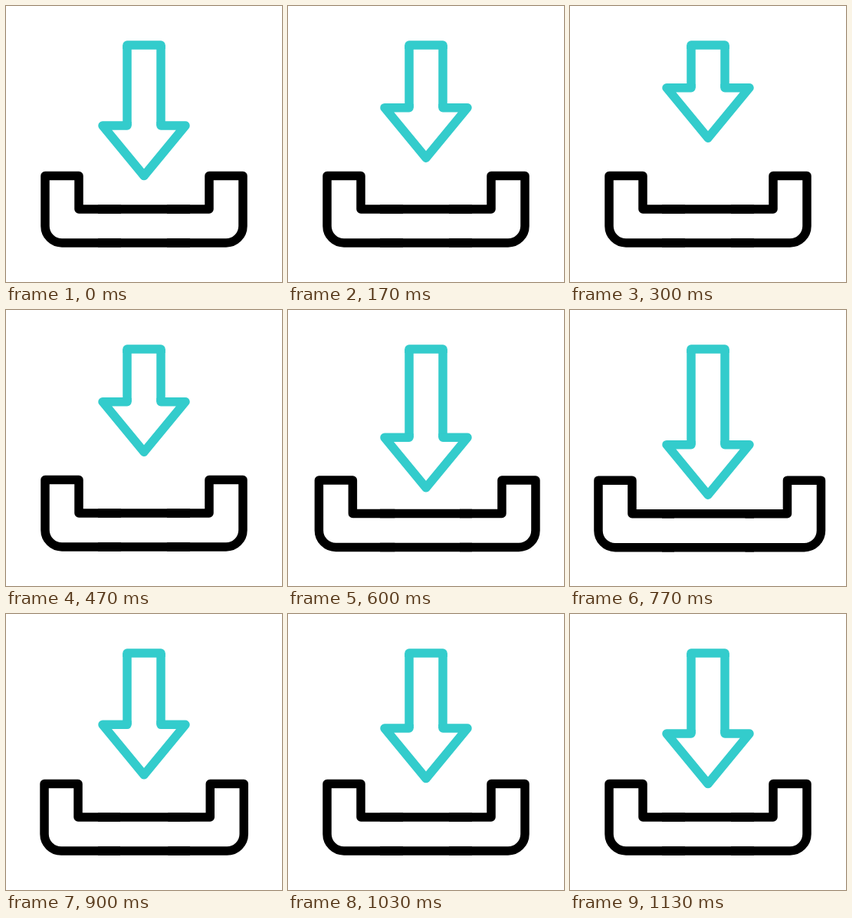
These frames come from a looping animation (360 px wide and 360 px high, 1.5 s). An HTML page without scripts:

```html
<!DOCTYPE html>
<html lang="en">
<head>
<meta charset="utf-8">
<title>Download</title>
<style>
  @property --tick {
    syntax: "<number>";
    inherits: true;
    initial-value: 0;
  }

  html, body {
    margin: 0;
    width: 100%;
    height: 100%;
    overflow: hidden;
    background: #fff;
  }

  /* 45 ticks per loop; each phase is a clamped 0..1 ramp, smoothed below */
  svg {
    display: block;
    width: 100%;
    height: 100%;
    animation: run 1500ms steps(45) -4ms infinite;

    --p-lift: clamp(0, var(--tick) / 11, 1);
    --p-drop: clamp(0, (var(--tick) - 11) / 10, 1);
    --p-open: clamp(0, (var(--tick) - 14) / 7, 1);
    --p-back: clamp(0, (var(--tick) - 21) / 7, 1);
    --p-rest: clamp(0, (var(--tick) - 28) / 6, 1);

    --lift: (var(--p-lift) * var(--p-lift) * (3 - 2 * var(--p-lift)));
    --drop: (var(--p-drop) * var(--p-drop) * (3 - 2 * var(--p-drop)));
    --open: (var(--p-open) * var(--p-open) * (3 - 2 * var(--p-open)));
    --back: (var(--p-back) * var(--p-back) * (3 - 2 * var(--p-back)));
    --rest: (var(--p-rest) * var(--p-rest) * (3 - 2 * var(--p-rest)));

    --dy: (82 * var(--drop) - 54 * var(--lift) - 42 * var(--back) + 14 * var(--rest));
    --spread: (var(--open) - var(--back));
  }

  @keyframes run {
    from { --tick: 0; }
    to { --tick: 45; }
  }

  path {
    fill: none;
    stroke-width: 11.5;
    stroke-linejoin: round;
  }
  .arrow { stroke: #3cc; }
  .tray { stroke: #000; transform: translateY(calc(0.8px * var(--spread))); }

  .head { transform: translateY(calc(1px * var(--dy))); }
  .shaft { transform: scaleY(calc(1 + var(--dy) / 105)); }
  .left { transform: translateX(calc(-17.5px * var(--spread))); }
  .right { transform: translateX(calc(23px * var(--spread))); }
</style>
</head>
<body>
<svg viewBox="0 0 360 360">
  <g class="tray">
    <path d="M120 265H240M120 309H240"/>
    <path class="left" d="M150 265H95V221.5H51V287A22 22 0 0 0 73 309H150"/>
    <path class="right" d="M210 265H265V221.5H309V287A22 22 0 0 1 287 309H210"/>
  </g>
  <g class="arrow">
    <path d="M158 56V51H202V56"/>
    <g transform="translate(0 51)">
      <path class="shaft" d="M158 0V105M202 0V105"/>
    </g>
    <path class="head" d="M158 151V156H126L180 221.5L234 156H202V151"/>
  </g>
</svg>
</body>
</html>
```
